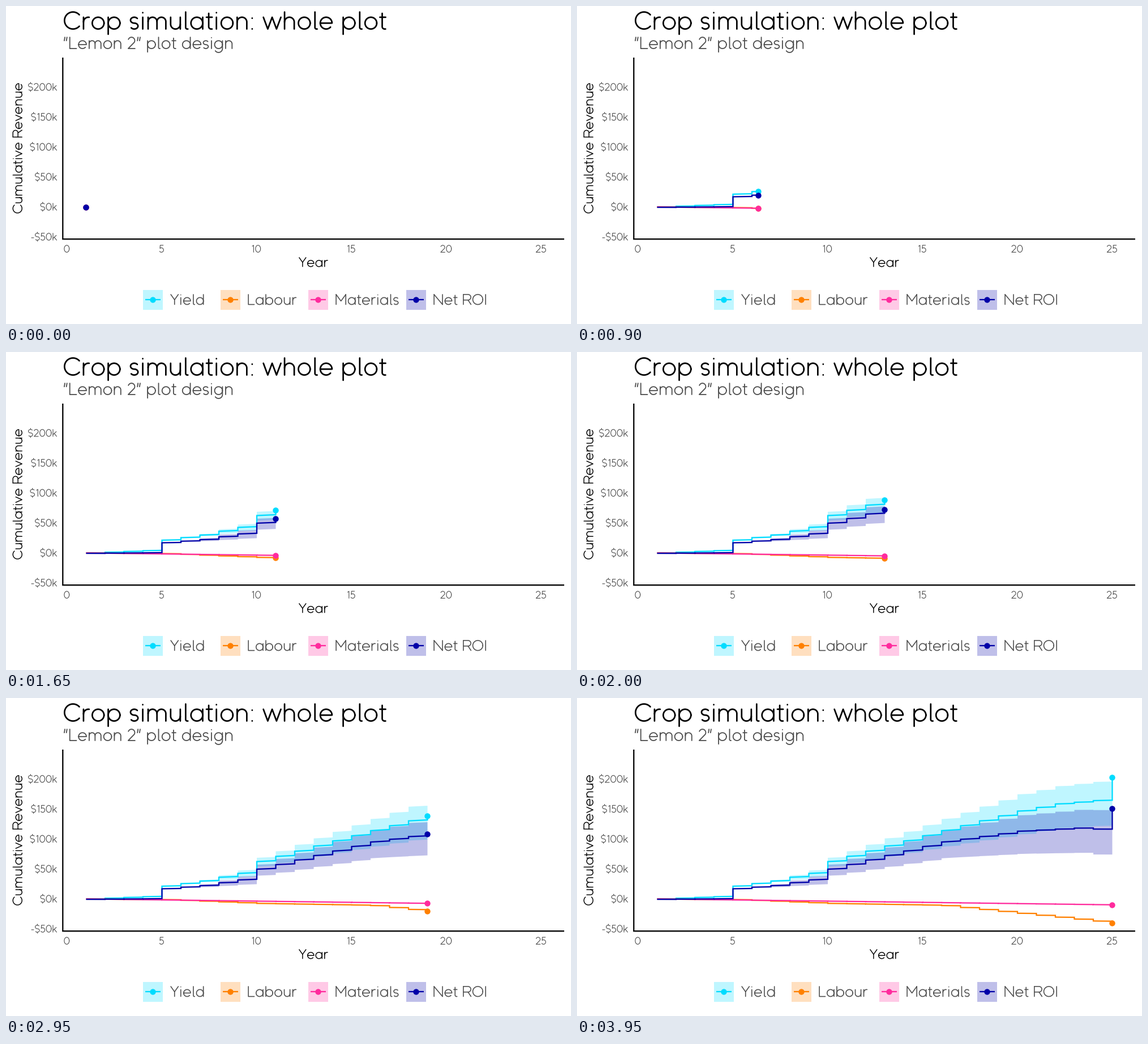
A matplotlib script for the animation above (5 s loop, 998 by 561 pixels).

```python
import numpy as np
import matplotlib.pyplot as plt
from matplotlib.animation import FuncAnimation
from matplotlib.collections import LineCollection
from matplotlib.patches import Polygon, Rectangle

W, H, DPI = 998, 561, 64
PX = 72 / DPI  # points per pixel
FRAMES, MOVING, INTERVAL = 100, 79, 50

CYAN, ORANGE, PINK, NAVY = "#00dcff", "#ff8000", "#ff2b9d", "#0000a8"
GREY = "#4d4d4d"

fig = plt.figure(figsize=(W / DPI, H / DPI), dpi=DPI, facecolor="white")
ax = fig.add_axes([0, 0, 1, 1])
ax.set_xlim(0, W)
ax.set_ylim(H, 0)
ax.axis("off")

# ---- rounded monoline lettering, 1000 units per em ----
STROKE = 58
BASE, XTOP, CAP, DESC = 30, 473, 670, -168
MID, CAPMID = (BASE + XTOP) / 2, (BASE + CAP) / 2
R, CR = (XTOP - BASE) / 2, (CAP - BASE) / 2
ARCH, NARROW = 182, 167
SPACE = 262


def line(*xy):
    return np.array(xy, float).reshape(-1, 2)


def arc(cx, cy, rx, ry, a=0, b=360):
    t = np.radians(np.linspace(a, b, 48))
    return np.column_stack([cx + rx * np.cos(t), cy + ry * np.sin(t)])


def join(*parts):
    return np.vstack(parts)


def stem(x, top, bottom=BASE):
    return line(x, top, x, bottom)


def dot(y):
    return line(0, y, 0, y + 8)


def bowl(a=0, b=360):
    return arc(R, MID, R, R, a, b)


def arch(x, r):
    return join(arc(x + r, XTOP - r, r, r, 180, 0), line(x + 2 * r, BASE))


def turn(parts):
    return [(0, BASE + XTOP) - p for p in parts]


def tail(top, r):
    return join(line(0, top), arc(r, BASE + r, r, r, 180, 270), line(1.4 * r, BASE))


def zigzag(step, *ys):
    return np.column_stack([step * np.arange(len(ys)), ys])


def ess(top, w):
    r = (top - BASE) / 4
    return join(arc(0, top - r, w, r, 35, 270), arc(0, BASE + r, w, r, 90, -145))


LETTER_N = [stem(0, XTOP), arch(0, ARCH)]
GLYPHS = {
    "a": [bowl(), stem(2 * R, XTOP)],
    "b": [bowl(), stem(0, CAP)],
    "c": [bowl(45, 315)],
    "d": [bowl(), stem(2 * R, CAP)],
    "e": [join(line(0, MID), bowl(0, 318))],
    "g": [bowl(), join(line(2 * R, XTOP), arc(R, BASE, R, R, 0, -145))],
    "h": [stem(0, CAP), arch(0, ARCH)],
    "i": [stem(0, XTOP), dot(CAP - 30)],
    "k": [stem(0, CAP), line(304, XTOP, 0, 190), line(120, 300, 334, BASE)],
    "l": [tail(CAP, 60)],
    "m": [stem(0, XTOP), arch(0, NARROW), arch(2 * NARROW, NARROW)],
    "n": LETTER_N,
    "o": [bowl()],
    "p": [bowl(), stem(0, XTOP, DESC)],
    "r": [stem(0, XTOP), arc(ARCH, XTOP - ARCH, ARCH, ARCH, 180, 80)],
    "s": [ess(XTOP, 140)],
    "t": [tail(CAP - 50, 90), line(-88, XTOP, 130, XTOP)],
    "u": turn(LETTER_N),
    "v": [zigzag(192, XTOP, BASE, XTOP)],
    "w": [zigzag(165, XTOP, BASE, XTOP, BASE, XTOP)],
    "C": [arc(CR, CAPMID, CR, CR, 42, 318)],
    "I": [stem(0, CAP)],
    "L": [line(0, CAP, 0, BASE, 380, BASE)],
    "M": [stem(0, CAP), zigzag(310, CAP, 250, CAP), stem(620, CAP)],
    "N": [stem(0, CAP), line(0, CAP, 540, BASE), stem(540, CAP)],
    "O": [arc(CR, CAPMID, CR, CR)],
    "R": [stem(0, CAP), line(300, 314, 490, BASE),
          join(line(0, CAP), arc(300, 492, 178, 178, 90, -90), line(0, 314))],
    "Y": [zigzag(240, CAP, 330, CAP), stem(240, 330)],
    "0": [arc(0, CAPMID, 228, CR)],
    "1": [line(-120, 580, 0, CAP, 0, BASE)],
    "2": [join(arc(0, 482, 185, 188, 160, -35), line(-185, BASE, 200, BASE))],
    "5": [join(line(170, CAP, -105, CAP), arc(0, 233, 195, 203, 130, -145))],
    "$": [ess(CAP, 192), stem(0, CAP + 100, CAP), stem(0, BASE, BASE - 100)],
    "-": [line(0, MID, 210, MID)],
    ":": [dot(XTOP - 40), dot(BASE)],
    '"': [line(x, CAP, x - 35, XTOP) for x in (0, 120)],
}


def bearing(ch, straight, open_side):
    """Room beside a glyph, by the kind of edge it shows."""
    if ch in open_side:
        return 48
    if ch in "il:I1":
        return 112
    return 90 if ch in straight else 68


def write(text, x, y, size, color, align=0.0, upright=False):
    """Draw text on baseline y; align 0, 0.5 or 1 sets its left, middle or right at x."""
    pen, strokes = 0, []
    for ch in text:
        if ch == " ":
            pen += SPACE
            continue
        xs = join(*GLYPHS[ch])[:, 0]
        pen += bearing(ch, "bhkmnpruLMNR", "tvwY")
        strokes += [p + (pen - xs.min(), 0) for p in GLYPHS[ch]]
        pen += np.ptp(xs) + bearing(ch, "adghmnuMN", "klrtvwLRY")
    us = join(*strokes)[:, 0]
    lo, hi = us.min() - STROKE / 2, us.max() + STROKE / 2
    shift = lo + align * (hi - lo)
    k = size / 1000
    segs = []
    for p in strokes:
        u, v = (p[:, 0] - shift) * k, p[:, 1] * k
        segs.append(np.column_stack([x - v, y - u] if upright else [x + u, y - v]))
    ax.add_collection(LineCollection(segs, colors=color, linewidths=STROKE * k * PX,
                                     capstyle="round", joinstyle="round", snap=False),
                      autolim=False)


def stroke(xs, ys, color, zorder=2):
    return ax.plot(xs, ys, color=color, lw=2.3 * PX, zorder=zorder, snap=False,
                   solid_capstyle="butt", solid_joinstyle="miter")[0]


def marker(xs, ys, color):
    return ax.plot(xs, ys, "o", color=color, ms=10.4 * PX, mew=0, zorder=4, snap=False)[0]


def px(year):
    return 108 + 33.5 * np.asarray(year, float)


def py(thousands):
    return 354.5 - 1.057 * np.asarray(thousands, float)


# ---- fixed parts ----
write("Crop simulation: whole plot", 102, 42, 46.9, "black")
write('"Lemon 2" plot design', 102, 76, 31.2, GREY)
write("Year", 543, 460.5, 25, "black", 0.5)
write("Cumulative Revenue", 29, 251, 25, "black", 0.5, upright=True)
for v in range(-50, 201, 50):
    sign = "-" if v < 0 else ""
    write(f"{sign}${abs(v)}k", 90, py(v) + 6.4, 19.3, GREY, 1)
for year in range(0, 26, 5):
    write(str(year), px(year) - 0.7, 435, 19.3, GREY, 0.5)
stroke([100.3, 100.3, 986], [91, 411.2, 411.2], "black")

for name, color, x in [("Yield", CYAN, 242), ("Labour", ORANGE, 379),
                       ("Materials", PINK, 534), ("Net ROI", NAVY, 707)]:
    ax.add_patch(Rectangle((x, 501), 35, 34.5, fc=color, alpha=0.25, lw=0))
    stroke([x + 4, x + 31], [518, 518], color)
    marker([x + 17.5], [518], color)
    write(name, x + 48.3, 527.4, 27.6, GREY)

# ---- series: a step at each year, then a slow drift until the next ----
YEARS = np.arange(1, 26)


def curve(xs, ys):
    return np.interp(YEARS, xs, ys)


def nodes(start, drift):
    """Alternate each year's opening value with its value one year on."""
    out = np.empty(2 * len(YEARS) - 1)
    out[::2] = start
    out[1::2] = (start + drift)[:-1]
    return out


def reveal(values, t):
    """Nodes up to time t, ending in the interpolated point."""
    last = 2 * (int(t) - 1)
    part = t - int(t)
    shown = values[:last + 1]
    if part > 0:
        a, b = values[last:last + 2]
        shown = np.append(shown, a + part * (b - a))
    return shown


NODE_X = nodes(YEARS, np.ones(25))


class Series:
    def __init__(self, color, start, drift, up=None, down=None):
        self.y = nodes(start, drift)
        self.band = None
        if up is not None:
            self.hi = nodes(start + up, drift)
            self.lo = nodes(start - down, drift)
            self.band = Polygon([(0, 0)] * 3, fc=color, alpha=0.25, lw=0, zorder=2)
            ax.add_patch(self.band)
        self.line = stroke([], [], color, zorder=3)
        self.dot = marker([], [], color)

    def show(self, t):
        x, y = px(reveal(NODE_X, t)), py(reveal(self.y, t))
        self.line.set_data(x, y)
        self.dot.set_data(x[-1:], y[-1:])
        if self.band:
            hi, lo = py(reveal(self.hi, t)), py(reveal(self.lo, t))
            self.band.set_xy(np.column_stack([np.append(x, x[::-1]),
                                              np.append(hi, lo[::-1])]))


def spread(*ys):
    return curve([6, 10, 20, 25], ys)


series = [
    Series(CYAN,
           curve([1, 4, 5, 7, 9, 10, 16, 20, 22, 24, 25],
                 [0, 3.7, 21.3, 29.8, 42.6, 62.4, 114, 146.6, 158.5, 164.1, 202.7]),
           curve([1, 15, 25], [.2, 2.1, .5]),
           spread(0, 6.3, 28, 32), spread(0, 8.5, 39, 43.5)),
    Series(ORANGE, -curve([1, 5, 10, 15, 16, 25], [0, 1, 7.4, 10, 11, 40]),
           np.full(25, -.35)),
    Series(PINK, -0.41 * (YEARS - 1), np.full(25, -.3)),
    Series(NAVY,
           curve([1, 4, 5, 7, 9, 10, 16, 20, 23, 24, 25],
                 [-.6, .2, 17, 22.2, 31.7, 49.7, 95, 113, 118.2, 116.6, 150.9]),
           curve([1, 15, 25], [-.1, 2, -.3]),
           spread(0, 7.5, 26.5, 33), spread(0, 10.9, 38, 43.5)),
]

# every year opens on a whole frame
MARKS = np.round((YEARS - 1) * MOVING / 24 + 0.05)


def draw(i):
    t = float(np.interp(min(i, MOVING), MARKS, YEARS))
    for s in series:
        s.show(t)
    return []


anim = FuncAnimation(fig, draw, frames=FRAMES, interval=INTERVAL,
                     init_func=lambda: draw(0), repeat=True, repeat_delay=0, blit=False)
plt.show()
```
